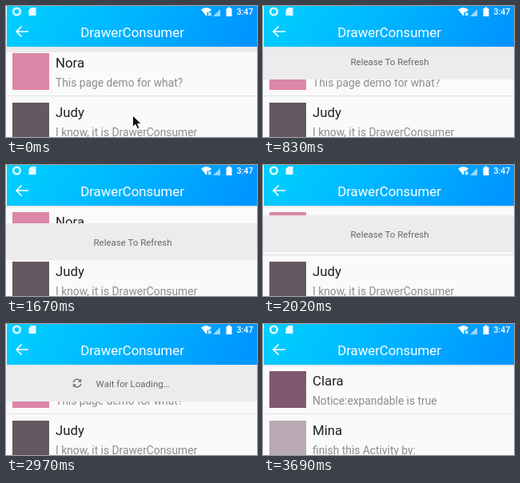
Animation of 314x164 px, one loop 4230 ms. Source, as an HTML page:

```html
<!DOCTYPE html>
<html lang="en">
<head>
<meta charset="utf-8">
<title>Pull to refresh</title>
<style>
  html, body { margin: 0; width: 100%; height: 100%; overflow: hidden; background: #fafafa; }
  svg { display: block; font-family: Roboto, sans-serif; }
  .name { font-size: 16.8px; fill: #212121; }
  .note { font-size: 13.8px; fill: #8c8c8c; }
  .bar { fill: none; stroke: #fff; }
</style>
</head>
<body>
<svg width="314" height="164" viewBox="0 0 314 164">
  <defs>
    <linearGradient id="sky" x1="0" y1="0" x2="1" y2=".1">
      <stop offset="0" stop-color="#00d0ff"/>
      <stop offset=".5" stop-color="#00b6ff"/>
      <stop offset="1" stop-color="#0096ff"/>
    </linearGradient>
  </defs>

  <rect width="314" height="164" fill="#fafafa"/>
  <g id="rows"></g>
  <path d="M0 112.5H314" stroke="#e0e0e0"/>

  <g id="pull">
    <rect width="314" height="46" fill="#ececec"/>
    <g id="spin" fill="none" stroke="#707070" stroke-width="1.4">
      <path d="M-4.7 -.8A4.8 4.8 0 0 1 3.6 -3.2M4.7 .8A4.8 4.8 0 0 1 -3.6 3.2"/>
      <path d="M5.2 -5.4V-1.2H1ZM-5.2 5.4V1.2H-1Z" fill="#707070" stroke="none"/>
    </g>
    <text id="hint" x="158.5" y="28" font-size="11.5" text-anchor="middle" fill="#666"></text>
  </g>

  <path d="M0 52H314" stroke="#e9e9e9" stroke-width="2"/>
  <rect x="1" width="313" height="51" fill="url(#sky)"/>
  <text x="158" y="39" font-size="16.8" text-anchor="middle" fill="#fff">DrawerConsumer</text>
  <path class="bar" d="M28 32H13M19.5 25.5L13 32L19.5 38.5" stroke-width="1.7"/>

  <!-- status bar -->
  <circle class="bar" cx="13.5" cy="7" r="4.3" stroke-width="2.6" stroke-opacity=".85"/>
  <path d="M31.5 2H37.5V12H28.5V5Z" fill="#fff" fill-opacity=".9"/>
  <path d="M244 4.5Q250.5 -.5 257 4.5L254.5 7.5H251.5V11.5L250.5 12.5Z" fill="#fff"/>
  <path class="bar" d="M253 8.5L256.5 12M256.5 8.5L253 12" stroke-width="1.1"/>
  <path d="M268 4V13H259Z" fill="#fff" fill-opacity=".6"/>
  <path d="M277.5 1.5H280.5V3H282.5V13H275.5V3H277.5Z" fill="#fff"/>
  <text x="288.5" y="11" font-size="10.6" font-weight="500" fill="#fff">3:47</text>

  <path id="mouse" d="M0 0V14.5L3.4 11.3L6 17L8.4 16L6 10.4H10.6Z" fill="#111" stroke="#fff" stroke-width=".9"/>
</svg>
<script>
const LOOP = 4230, STEP = 119.3, LEAD = 12.5;
const $ = id => document.getElementById(id);

const row = ([name, note, color], i) => `<g transform="translate(0 ${62 * i})">
  <rect x="8" y="59" width="46" height="46" fill="${color}"/>
  <text class="name" x="62" y="77">${name}</text>
  <text class="note" x="62" y="101">${note}</text></g>`;

const before = [
  ["Nora", "This page demo for what?", "#dc86a8"],
  ["Judy", "I know, it is DrawerConsumer", "#665860"],
].map(row).join("");
const after = [
  ["Clara", "Notice:expandable is true", "#80586e"],
  ["Mina", "finish this Activity by:", "#b9a9b2"],
].map(row).join("");

const glide = (k, k0, k1, a, b, power = 1) =>
  b + (a - b) * (1 - (k - k0) / (k1 - k0)) ** power;

// lower edge of the pull panel at step k
function edge(k) {
  if (k < 5) return glide(k, 0, 5, 58, 80);
  if (k < 11) return glide(k, 5, 11, 80, 116);
  if (k < 14) return 116;
  if (k < 17) return Math.min(105 + k, 120);
  if (k < 20) return glide(k, 16, 20, 120, 97, 2);
  if (k < 28) return 97;
  return glide(Math.min(k, 31), 27, 31, 97, 51, 3);
}

let shown;
function draw(now) {
  const k = Math.floor((now % LOOP + LEAD) / STEP);
  const list = k < 28 ? before : after;
  if (list !== shown) $("rows").innerHTML = shown = list;

  const loading = k >= 20;
  $("pull").setAttribute("transform", `translate(0 ${Math.floor(edge(k)) - 46})`);
  $("hint").textContent = loading ? "Wait for Loading…" : k < 7 ? "Pull To Refresh" : "Release To Refresh";
  $("spin").setAttribute("visibility", loading ? "visible" : "hidden");
  $("spin").setAttribute("transform", `translate(89 23) rotate(${36 * (Math.min(k, 25) - 25)})`);
  $("mouse").setAttribute("transform", `translate(158.5 ${137 + 7 * k})`);
  requestAnimationFrame(draw);
}
requestAnimationFrame(draw);
</script>
</body>
</html>
```
